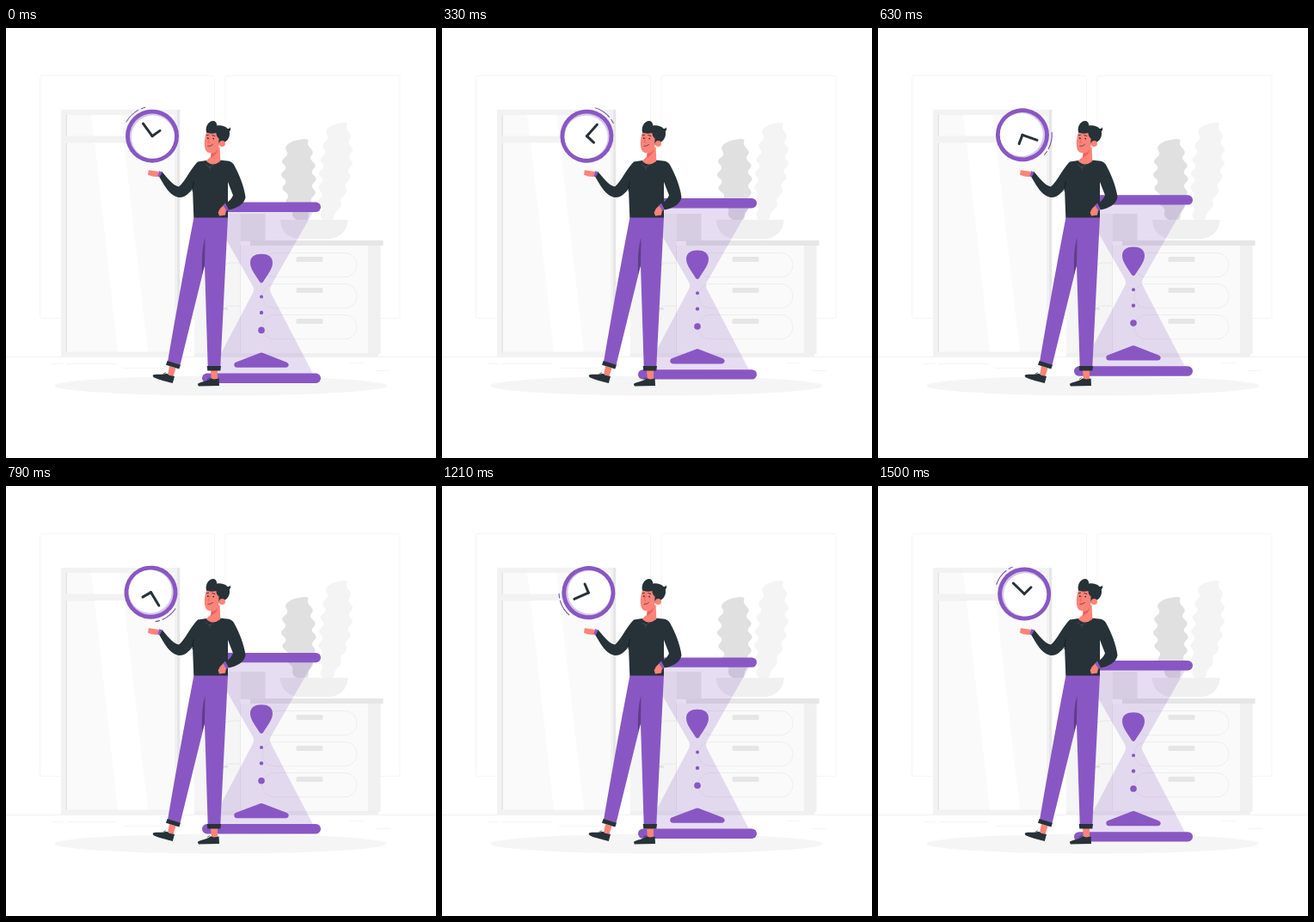
Animation of 500x500 px, one loop 1540 ms. Source, as an HTML page:

```html
<!DOCTYPE html>
<html lang="en">
<head>
<meta charset="utf-8">
<title>Time management</title>
<style>
  html, body { margin: 0; width: 100%; height: 100%; overflow: hidden; background: #fff; }
  svg { display: block; width: 100vw; height: 100vh; }
  .purple { fill: #8957c3; }
  .dark { fill: #263238; }
  .skin { fill: #ff8378; }
  .line { fill: none; stroke: #263238; stroke-linecap: round; stroke-linejoin: round; }
</style>
</head>
<body>
<svg viewBox="0 0 500 500">
  <!-- room -->
  <g fill="none" stroke="#f5f5f5">
    <rect x="39.5" y="55.5" width="203" height="282" rx="2"/>
    <rect x="255" y="55.5" width="203" height="282" rx="2"/>
  </g>
  <path d="M0 382.4H500" stroke="#ebebeb" stroke-width=".7"/>
  <path d="M53 390.5H67M70 390.5H128M400 389.5H416M136 395.5H183M430 398.5H447" stroke="#f0f0f0" stroke-width=".7"/>

  <!-- wardrobe -->
  <rect x="64" y="95" width="138" height="287" fill="#f2f2f2"/>
  <rect x="199" y="95" width="3.3" height="287" fill="#e6e6e6"/>
  <g fill="#fafafa">
    <rect x="70" y="101" width="126" height="24.5"/>
    <rect x="70" y="133.5" width="126" height="243"/>
  </g>
  <path d="M99 101H133L136 125.5H102ZM103 133.5H137L165 376.5H130Z" fill="#fff"/>
  <path d="M70.2 101V125.5M70.2 133.5V376.5" stroke="#e0e0e0" stroke-width="1.2"/>

  <!-- cabinets -->
  <rect x="219" y="216" width="54" height="164" fill="#f5f5f5"/>
  <rect x="273" y="216" width="28.5" height="32" fill="#ebebeb"/>
  <rect x="273" y="253" width="148" height="126" fill="#fafafa"/>
  <rect x="421" y="253" width="14.5" height="126" fill="#f0f0f0"/>
  <rect x="284" y="247" width="154.6" height="6" fill="#e6e6e6"/>
  <rect x="219" y="378" width="214" height="4.4" fill="#f0f0f0"/>
  <path d="M272.5 253V377" stroke="#e6e6e6" stroke-width=".8"/>
  <path d="M272 273H262Q252 273 251 284M272 323H262Q252 323 251 334" fill="none" stroke="#e8e8e8"/>
  <path d="M250 329Q252 325 258 327" fill="none" stroke="#e0e0e0" stroke-width="2"/>
  <g id="drawers"></g>

  <!-- plant -->
  <path id="leafA" fill="#e0e0e0"/>
  <path id="leafB" fill="#f4f4f4"/>
  <path d="M319 223H397.5C397.5 237 386 245.5 373 245.5H343C330 245.5 319 237 319 223Z" fill="#f0f0f0"/>

  <ellipse cx="249.5" cy="416" rx="193.5" ry="11.4" fill="#f5f5f5"/>

  <!-- hourglass -->
  <g id="glass" class="purple">
    <path d="M237 213H357.5L308 300Q306 304 308 308L357.5 403H237L287 308Q289 304 287 300Z" opacity=".2"/>
    <rect x="228" y="202.5" width="138" height="11.4" rx="5.7"/>
    <rect x="228" y="401.6" width="138" height="11.4" rx="5.7"/>
    <path d="M284 273C284 266 289 262.8 297 262.8C305 262.8 310 266 310 273C310 281 303 288 299.3 294.8Q297 298 294.7 294.8C291 288 284 281 284 273Z"/>
    <path d="M267 388.7L295.5 377.8Q297 377.2 298.5 377.8L326.5 388.7Q329.5 390.4 328.4 393Q327.8 394.8 325.5 394.8H268.5Q266 394.8 265.5 393Q264.6 390 267 388.7Z"/>
    <circle cx="297" cy="312.6" r="2"/>
    <circle cx="297" cy="331" r="2.2"/>
    <circle cx="297" cy="351.4" r="3.8"/>
  </g>

  <!-- legs -->
  <path class="skin" d="M190 393L197.500 395.500L194.500 405L188 403ZM238 398H246V409H239Z"/>
  <path class="dark" d="M171 403.4C176 402.200 181 403.600 187 401.800L190 403.800L196 405L193.800 413C186 410.600 178 409.400 171.800 406.200Q170 404.600 171 403.400Z"/>
  <path class="dark" d="M223.500 413.300C229 411 234 410.800 238 407.300L242 408.500L247.600 407.500L248 416L224 416.600Q222.200 414.800 223.500 413.300Z"/>
  <path d="M183 402.200L186 400.500M234 408.500L237 406.500" stroke="#263238" stroke-width=".7"/>
  <path class="purple" d="M218.500 220H258L249.300 394H234.700L231 276L202.500 392L188 388Q203 300 218.500 220Z"/>
  <path d="M231.500 244Q227 258 228 286L231 276Z" fill="#5f3c8b"/>
  <path class="dark" d="M187.600 387L203 391.800L201.300 396.600L186 391.800ZM233.700 393H250L249.300 398.600H234.300Z"/>

  <!-- body -->
  <path class="dark" d="M233 154L223 155.500C215 163 208 179 201 184.500C193 183 187 173 181 166.800L177.800 172.500C184 182 190 196 202 197C208 197 213 192 217 187L218.300 220.600H258L258 179L264 194.500Q262 200 255.500 204L258.500 211.500C268 210 277 205 278.500 197C277 184 271 170 265 159Q262 154.800 257 154.600L248 153.500Z"/>
  <path class="purple" d="M178.500 166L181.500 168L178.500 173.600L175.500 172ZM252 206.500L255 203.500L258.500 210.500L256.500 213Z"/>
  <path class="skin" d="M165.800 165.200L178 167L176 173L170 172.600L165 170.700Z"/>
  <path class="skin" d="M252.500 206.500L256 212L255 217.600L248 218.400L246.700 214.500L248.800 210Z"/>
  <path d="M218.500 178Q216.500 184 217 190" fill="none" stroke="#111a1e" stroke-width=".8"/>

  <!-- head -->
  <path class="skin" d="M238.800 143L237.800 150Q234 152.500 232.800 154.800Q240 162 249.300 155L248.600 138Z"/>
  <path d="M239 145.500Q243 146 246.500 141Q245 148 238.500 151Z" fill="#e9655c"/>
  <path class="skin" d="M234 119C231 126 229.600 135 232 141.500C234 147 242 146.500 247 140L250 119Z"/>
  <path class="dark" d="M233 121.500C231.300 115 235.500 108 241 108C244 108.200 245.200 111 245.300 113.400C250 112.800 255 113.800 257.500 117Q260.300 117.500 260.200 115.500Q262.400 117 259.800 120.600C261 127 257.500 131.500 253 133.500L248 136.500Q246.800 132 247.600 128.500Q244.500 126 244.400 122Q238 123.500 233 121.500Z"/>
  <circle class="skin" cx="251.400" cy="134.400" r="3.500"/>
  <g class="line" stroke-width=".9">
    <path d="M233.200 124.800L235.500 124.300M239.800 124.600L242.800 125.600"/>
    <path d="M235 137.400Q238.500 137.600 240.500 135.500" stroke-width=".7"/>
    <path d="M236.800 128L235 132.800L237 133.200" stroke="#d85850" stroke-width=".6"/>
    <path d="M232.500 159L237 162L241 159.500M237 162V164.500" stroke="#526068" stroke-width=".6"/>
  </g>
  <g class="dark"><circle cx="234.800" cy="128.200" r=".9"/><circle cx="241.200" cy="128.600" r=".9"/></g>

  <!-- clock, placed around its spin centre -->
  <g id="clock">
    <g transform="translate(.8 1)">
      <circle class="purple" r="31"/>
      <circle r="26.200" fill="#d5c7e8"/>
      <circle cx=".8" cy=".9" r="25" fill="#fff"/>
      <g id="hands" class="line" stroke-width="3"></g>
      <g id="dashes" fill="none" stroke="#6d45a0" stroke-width="1" stroke-linecap="round"></g>
    </g>
  </g>
</svg>
<script>
  const LOOP = 1540, STEPS = 37;
  const $ = id => document.getElementById(id);

  // Smooth closed outline guided by a list of points
  function blob(pts) {
    const mid = (a, b) => [(a[0] + b[0]) / 2, (a[1] + b[1]) / 2];
    const last = pts[pts.length - 1];
    return pts.reduce((d, p, i) => d + `Q${p} ${mid(p, pts[(i + 1) % pts.length])}`,
      `M${mid(last, pts[0])}`) + "Z";
  }

  // Leaf with lobes alternating along a spine from (x0,y0) to (x1,y1)
  function leaf(x0, y0, x1, y1, width, lobes, bend) {
    const left = [], right = [];
    for (let i = 0; i <= lobes * 2; i++) {
      const u = i / (lobes * 2);
      const x = x0 + (x1 - x0) * u + bend * Math.sin(Math.PI * u);
      const y = y0 + (y1 - y0) * u;
      const w = 3 + width * Math.pow(Math.sin(Math.PI * (0.12 + 0.85 * u)), 0.7);
      left.push([x - w * (i % 2 ? 1.25 : 0.68), y + 2]);
      right.push([x + w * (i % 2 ? 0.72 : 1.22), y - 1]);
    }
    return blob([...left, ...right.reverse()]);
  }

  // Angles are degrees clockwise from twelve o'clock
  function polar(deg, r) {
    const a = deg * Math.PI / 180;
    return `${(r * Math.sin(a)).toFixed(2)} ${(-r * Math.cos(a)).toFixed(2)}`;
  }
  const hand = (deg, r) => `<path d="M0 0L${polar(deg, r)}"/>`;
  const arc = (from, to, r) => `<path d="M${polar(from, r)}A${r} ${r} 0 0 1 ${polar(to, r)}"/>`;

  $("leafA").setAttribute("d", leaf(340, 129, 345, 224, 15.5, 6, -2));
  $("leafB").setAttribute("d", leaf(386, 110, 374, 224, 14.5, 7, 3));
  $("drawers").innerHTML = [261.5, 297.5, 333.5].map(y =>
    `<rect x="298" y="${y}" width="110" height="28.3" rx="14" fill="none" stroke="#ececec" stroke-width=".9"/>
     <rect x="337.5" y="${y + 4.6}" width="31" height="6" rx="1.5" fill="#e6e6e6"/>`).join("");
  $("hands").innerHTML = hand(-36, 18) + hand(55, 11);
  $("dashes").innerHTML = arc(-61, -28, 34.3) + arc(-22, -14, 34.3);

  function draw(now) {
    const step = Math.min(STEPS - 1, Math.floor((now % LOOP + 5) * STEPS / LOOP));
    const p = step / STEPS;
    const phase = (p + 50 / LOOP) % 1;
    const lift = 0.65 - 10.2 * (1 - Math.abs(1 - 2 * phase));
    $("glass").setAttribute("transform", `translate(0 ${lift.toFixed(3)})`);
    $("clock").setAttribute("transform", `translate(169.2 124.7) rotate(${(p * 360).toFixed(3)})`);
  }

  function tick() {
    draw(performance.now());
    requestAnimationFrame(tick);
  }
  tick();
</script>
</body>
</html>
```
